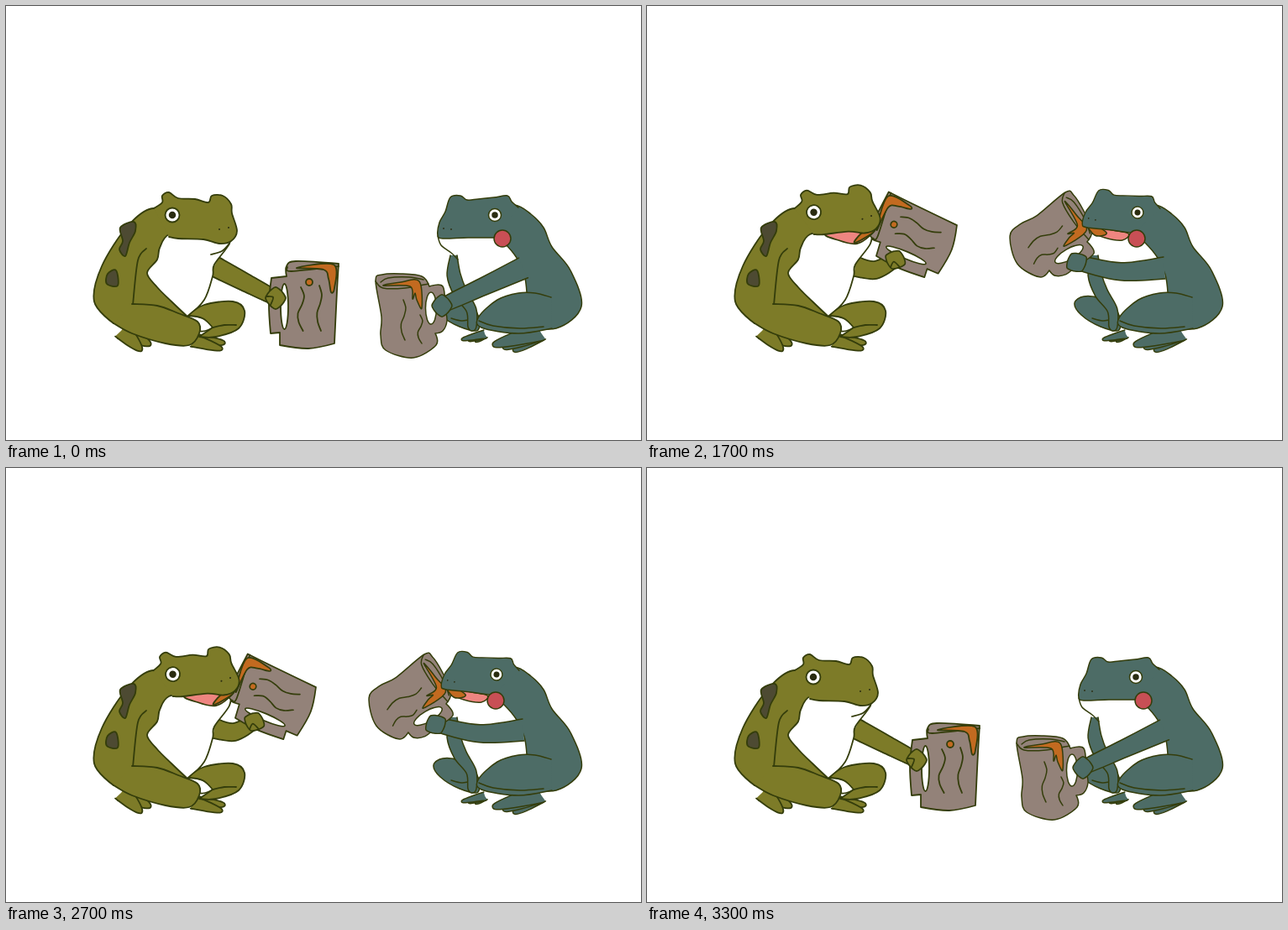
Animation, 756 px wide and 517 px high, one loop 3.4 s. Source, as an HTML page:

```html
<!DOCTYPE html>
<html lang="en">
<head>
<meta charset="utf-8">
<title>Two frogs drinking</title>
<style>
  html, body { margin: 0; width: 100%; height: 100%; overflow: hidden; background: #fff; }
  svg { display: block; width: 756px; height: 517px; }
  path, ellipse { stroke: #343d0b; stroke-width: 1.8; stroke-linejoin: round; stroke-linecap: round; fill: none; }
  #right path, #right ellipse { stroke-width: 1.5; }
  .olive { fill: #7d7b28; }
  .teal { fill: #4d6c66; }
  .white { fill: #fff; }
  .wood { fill: #938279; }
  .beer { fill: #c26a20; }
  .pink { fill: #ee8580; }
  .spot { fill: #4d4a32; }
  .cheek { fill: #c84f55; }
  svg .dark { fill: #2a2c10; stroke: none; }
  svg g .chest { fill: #fff; stroke: none; }
</style>
</head>
<body>
<svg viewBox="0 0 756 517"><g id="left"></g><g id="right"></g></svg>
<script>
const NS = 'http://www.w3.org/2000/svg';
const left = document.getElementById('left');
const right = document.getElementById('right');
const clamp = (v, lo = 0, hi = 1) => Math.max(lo, Math.min(hi, v));

function add(parent, tag, attrs = {}) {
  const node = document.createElementNS(NS, tag);
  for (const key in attrs) node.setAttribute(key, attrs[key]);
  return parent.appendChild(node);
}

// Smooth curve through points; a point with a third value is a sharp corner.
function curve(points, closed) {
  const n = points.length;
  const at = i => points[closed ? (i + n) % n : clamp(i, 0, n - 1)];
  const handle = (i, sign) => [0, 1].map(j => {
    const slope = at(i)[2] ? 0 : (at(i + 1)[j] - at(i - 1)[j]) / 6;
    return (at(i)[j] + sign * slope).toFixed(2);
  });
  let d = `M${points[0][0]} ${points[0][1]}`;
  for (let i = 0; i < (closed ? n : n - 1); i++) {
    d += `C${handle(i, 1)} ${handle(i + 1, -1)} ${at(i + 1)[0]} ${at(i + 1)[1]}`;
  }
  return d + (closed ? 'Z' : '');
}

// "x,y x,y! ...z": "!" marks a corner, "z" closes the outline.
function draw(parent, cls, text) {
  const points = text.replace('z', '').split(' ').map(p => {
    const [x, y] = p.split(',').map(parseFloat);
    return [x, y, p.endsWith('!')];
  });
  return add(parent, 'path', { class: cls, d: curve(points, text.endsWith('z')) });
}

const oval = (parent, cls, cx, cy, rx, ry = rx) => add(parent, 'ellipse', { class: cls, cx, cy, rx, ry });

function eye(parent, x, y, r) {
  oval(parent, 'white', x, y, r);
  oval(parent, 'dark', x, y, r * 0.5);
}

// Tapering limb around a chain of joints, open at its root.
function limb(joints, widths) {
  const sides = [[], []];
  joints.forEach(([x, y], i) => {
    const a = joints[Math.max(0, i - 1)], b = joints[Math.min(joints.length - 1, i + 1)];
    const angle = Math.atan2(b[1] - a[1], b[0] - a[0]);
    const dx = -Math.sin(angle) * widths[i], dy = Math.cos(angle) * widths[i];
    sides[0].push([x + dx, y + dy]);
    sides[1].unshift([x - dx, y - dy]);
  });
  const [tip, before] = [joints.at(-1), joints.at(-2)];
  const reach = widths.at(-1) / Math.hypot(tip[0] - before[0], tip[1] - before[1]);
  const end = [0, 1].map(j => tip[j] + (tip[j] - before[j]) * reach);
  return curve([...sides[0], end, ...sides[1]]);
}

// Toes spread evenly from the first tip, all growing from one heel.
function foot(parent, cls, heel, tip, spread, count, size) {
  for (let i = 0; i < count; i++) {
    const toe = [tip[0] + spread[0] * i, tip[1] + spread[1] * i];
    const ball = [0, 1].map(j => heel[j] + (toe[j] - heel[j]) * 0.6);
    add(parent, 'path', { class: cls, d: limb([heel, ball, toe], [size, size * 0.7, size * 0.35]) });
  }
}

function grain(parent, x, y, length, sway) {
  const points = Array.from({ length: 6 }, (_, i) => [x + sway * Math.sin(i * 1.4), y + length * i / 5]);
  add(parent, 'path', { d: curve(points) });
}

function hand(parent, cls, [x, y]) {
  const points = Array.from({ length: 12 }, (_, i) => {
    const a = i * Math.PI / 6, r = 11 + Math.cos(4 * a);
    return [x + r * Math.cos(a), y + r * 1.1 * Math.sin(a)];
  });
  add(parent, 'path', { class: cls, d: curve(points, true) });
}

// Value between neighbouring keys; p past the last key holds it.
function blend(keys, p) {
  const q = Math.min(p, keys.length - 1);
  const i = Math.min(Math.floor(q), keys.length - 2);
  return keys[i].map((v, j) => v + (keys[i + 1][j] - v) * (q - i));
}

// Keys place the mug's rim corner: x, y, angle, scale. The arm follows the grip.
function mover({ mug, arm, rim, grip, shoulder, widths, keys }) {
  return p => {
    const [x, y, angle, scale] = blend(keys, p);
    mug.setAttribute('transform',
      `translate(${x} ${y}) rotate(${angle}) scale(${scale}) translate(${-rim[0]} ${-rim[1]})`);
    const a = angle * Math.PI / 180, gx = (grip[0] - rim[0]) * scale, gy = (grip[1] - rim[1]) * scale;
    const wrist = [x + gx * Math.cos(a) - gy * Math.sin(a), y + gx * Math.sin(a) + gy * Math.cos(a)];
    const sag = Math.max(0, (340 - wrist[1]) * 0.22);
    const elbow = [(shoulder[0] + wrist[0]) / 2, (shoulder[1] + wrist[1]) / 2 + sag];
    arm.setAttribute('d', limb([shoulder, elbow, wrist], widths));
  };
}

// ---- olive frog ----
const leftArm = add(left, 'path', { class: 'olive' });
const leftMug = add(left, 'g');
draw(leftMug, 'wood', '334,310 345,304 396,307! 394,340 391,402! 360,408 326,404! 326,389! 315,390! 313,355 316,324! 334,322!z');
oval(leftMug, 'white', 331.5, 358, 4.5, 27);
draw(leftMug, '', '335,311 340,316 396,310');
draw(leftMug, 'beer', '346,312 390,308 391,336 387,341 384,325 378,314z');
oval(leftMug, 'beer', 361, 329, 4);
grain(leftMug, 351, 335, 52, 4);
grain(leftMug, 373, 333, 54, 3);
hand(leftMug, 'olive', [321, 348]);
draw(leftMug, '', '310,346 318,347 315,356');
const moveLeft = mover({
  mug: leftMug, arm: leftArm, rim: [397, 308], grip: [321, 348], shoulder: [248, 310], widths: [12, 10.5, 8],
  keys: [[397, 308, 0, 1], [395, 286, -4, 1], [354, 226, -30, 0.95], [289, 221, -67, 0.95]]
});

draw(left, 'olive', '176,241 145,262 114,310 105,352 128,378! 220,378! 236,330 205,262z');
draw(left, 'white', '194,272 183,288 180,302 168,318 180,335 197,352 216,370! 236,350 246,322 248,308 266,283 262,272 225,268z');
draw(left, '', '167,289 157,303 151,356');
draw(left, 'spot', '136,264 152,257 154,268 147,282 142,298 135,290 139,280z');
draw(left, 'spot', '121,319 131,315 133,333 120,331z');
foot(left, 'olive', [138, 386], [169, 402], [-10, 6], 2, 11);
foot(left, 'olive', [222, 398], [258, 401], [-3, 7], 2, 8);
draw(left, 'white', '217,370 232,371 246,382 230,387z');
draw(left, 'olive', '217,369! 236,356 270,352 284,363 277,384 250,394 230,394! 246,383! 234,372z');
draw(left, '', '246,383 260,380 274,380');
draw(left, 'olive', '128,378 150,390 190,402 218,404 230,390 228,376 205,366 180,357 150,355');

const leftMouth = add(left, 'g');
draw(leftMouth, 'pink', '214,270 276,256! 268,271 250,283 228,279z');
draw(leftMouth, 'beer', '247,282 256,270 276,256! 269,270z');
const leftHead = add(left, 'g');
draw(leftHead, 'olive', '176,241 186,234 186,226 194,222 205,229 225,230 241,234 245,226 258,226 268,236 269,247 275,268 268,280 254,283 235,278 205,277 194,275');
eye(leftHead, 198, 249, 8.5);
oval(leftHead, 'dark', 254, 266, 1);
oval(leftHead, 'dark', 265, 264, 1);
const leftChin = draw(left, '', '266,283 257,292 244,296');

// ---- teal frog ----
const farLeg = '509,354 520,346 540,349 560,364 562,386 540,382 517,368z';
draw(right, 'chest', '528,272 600,276 620,325 618,345 565,362 545,338z');
draw(right, 'teal', farLeg);
draw(right, '', '530,372 542,375 550,374');
add(right, 'path', {
  class: 'teal',
  d: limb([[533, 297], [533, 320], [541, 342], [554, 362], [555, 382]], [4, 8, 8, 6, 5])
});
draw(right, 'teal', '605,237 625,248 640,264 650,287 672,315 685,358 655,384 610,380! 620,341! 617,320 608,300 592,281 578,270! 575,245!z');
foot(right, 'teal', [570, 391], [560, 399], [-8, -1], 3, 5);
foot(right, 'teal', [636, 388], [607, 409], [-12, -3], 3, 11);
draw(right, 'teal', '649,347 630,342 610,342 585,350 563,370 566,383 610,390 650,384');
draw(right, '', '563,375 580,381 612,384 640,382');

const rightArm = add(right, 'path', { class: 'teal' });
const rightMug = add(right, 'g');
draw(rightMug, 'wood', '440,327 448,320 470,319 495,322 504,334! 520,334 523,360 525,375 520,387 511,390! 512,404 485,419 452,410 446,392 447,370z');
oval(rightMug, 'white', 506, 360, 6.5, 19);
draw(rightMug, '', '440,328 449,336 475,336 503,331');
draw(rightMug, '', '446,329 455,324 480,323 497,326');
draw(rightMug, 'beer', '449,333 470,329 492,328 495,360 489,350 487,342 484,349 481,334z');
grain(rightMug, 473, 350, 48, 3);
grain(rightMug, 493, 368, 34, 3);
hand(rightMug, 'teal', [519, 357]);
const moveRight = mover({
  mug: rightMug, arm: rightArm, rim: [440, 327], grip: [519, 357], shoulder: [616, 312], widths: [13, 10.5, 8],
  keys: [[440, 327, 0, 1], [441, 301, 4, 1], [442, 265, 12, 1], [498, 222, 60, 1], [503, 213, 64, 1]]
});

const rightMouth = add(right, 'g');
draw(rightMouth, 'pink', '524,257 550,266 573,271 566,279 545,276 531,269z');
draw(rightMouth, 'beer', '521,255 547,270 533,273z');
const rightChin = draw(right, 'white', '514,274 518,285 530,294 538,302');
const rightHead = add(right, 'g');
draw(rightHead, 'teal', '610,240 602,233 597,226 581,228 562,230 549,231 541,226 529,228 523,245 516,258 514,273 520,277 550,276 582,276');
eye(rightHead, 582, 249, 7.5);
oval(rightHead, 'dark', 521, 265, 0.9);
oval(rightHead, 'dark', 530, 266, 0.9);
const cheek = oval(right, 'cheek', 591, 277, 10);

const LOOP = 3400, REST = 1000, STEP = 100, STEPS = 24;
const start = performance.now();

function show(p) {
  const open = p > 2.5;
  const tip = Math.max(0, p - 3);
  moveLeft(p);
  moveRight(p);
  for (const mouth of [leftMouth, rightMouth]) mouth.style.display = open ? '' : 'none';
  for (const chin of [leftChin, rightChin]) chin.style.display = open ? 'none' : '';
  leftHead.setAttribute('transform', open ? 'translate(0 -2) rotate(-9 190 245)' : '');
  rightHead.setAttribute('transform', open
    ? `translate(${584 + 5 * tip} ${246 - tip}) rotate(${8 + 6 * tip}) scale(0.93) translate(-582 -249)` : '');
  cheek.setAttribute('cx', open ? 583 - 3 * tip : 591);
  cheek.setAttribute('cy', 277 - 3 * tip);
}

// Lift, bring to the mouth, then tip further; the way down mirrors the way up.
function pose(step) {
  const s = Math.min(step, STEPS - step);
  return clamp(s, 0, 2) + clamp((s - 2) / 3) + clamp((s - 8) / 2);
}

function tick() {
  const t = (performance.now() - start) % LOOP;
  show(pose(t < REST ? 0 : Math.floor((t - REST) / STEP) + 1));
  requestAnimationFrame(tick);
}
tick();
</script>
</body>
</html>
```
